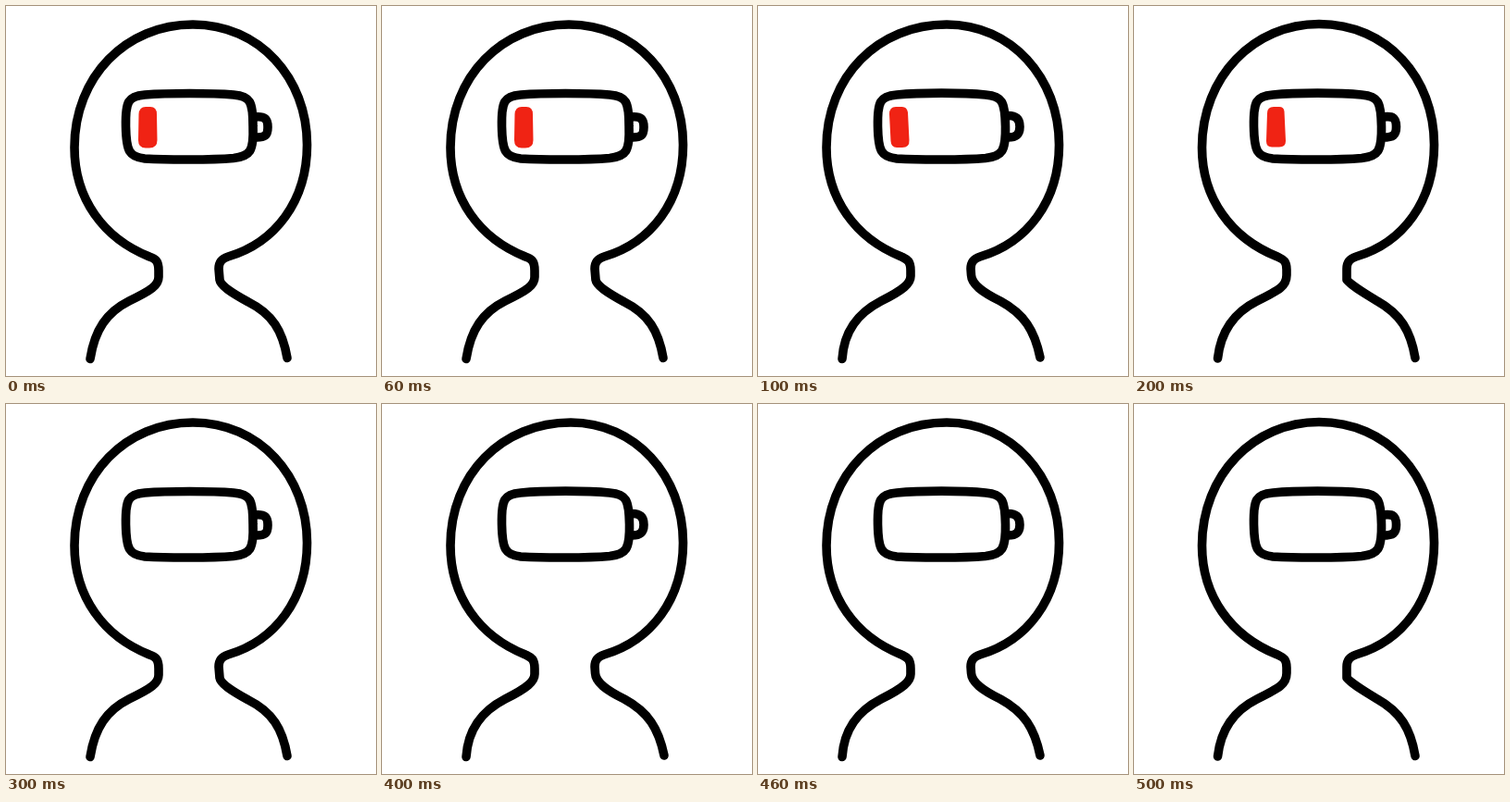
Write an HTML page that moves like this. It is 400 px wide and 400 px high and loops after 600 ms.

```html
<!DOCTYPE html>
<html lang="en">
<head>
<meta charset="utf-8">
<title>Low battery</title>
<style>
  html, body { margin: 0; height: 100%; overflow: hidden; background: #fff; }
  svg { display: block; width: 100vw; height: 100vh; }
  .line { fill: none; stroke: #000; stroke-width: 9.6; stroke-linecap: round; stroke-linejoin: round; }
</style>
</head>
<body>
<svg viewBox="0 0 400 400">
  <path id="body" class="line"/>
  <path id="cell" class="line"/>
  <path id="nub" class="line"/>
  <path id="charge" fill="#f02314"/>
</svg>
<script>
const STEP = 100;

// Three hand-drawn poses; only these details wobble.
const poses = [
  {
    top: 202, y: 20, left: 74, right: 325.5, start: '91,381.5 C96,350 109,331 133,319',
    neckL: 'C157,307.500 165,302 165,293 L165,286 C165,275 161,273 155,271',
    neckR: 'L231,296 C232,302 242,309 262,320', end: '304,380.5',
    cellTop: 95, cellRight: 267,
    nub: 'M269,120 C280,119 283,122 283,131 C283,140 280,142.500 269,142',
    charge: 'M151,109 H156 Q163,109 163,117 L163.500,145 Q163.500,153.500 155,153.500 H151 Q143,153.500 143,145 L143.500,117 Q144,109 151,109Z'
  },
  {
    top: 204, y: 20, left: 74, right: 325.5, start: '91,381.5 C93,351 108,332 133,319',
    neckL: 'C157,307 165,300 165,292 V286 C165,275 161,274 155,271',
    neckR: 'L230.500,291 C231,301 242,309 262,319', end: '305,380',
    cellTop: 94.5, cellRight: 267.5,
    nub: 'M269,118.500 C279,118 283,122 283,130.500 C283,139 279,142.500 269,142',
    charge: 'M149,109 H155 Q161,108.500 162,115 L163.500,145 Q164,153 156,153 H150 Q144,153 143.500,146 L142,117 Q142,109 149,109Z'
  },
  {
    top: 200, y: 19.5, left: 73.5, right: 324.5, start: '90.5,381 C94,350 109,331 133,319',
    neckL: 'C157,307 165,303 165,291 V285 C165,275 161,274 155,271',
    neckR: 'L230,296 C235,302 245,308 263,319', end: '304,380.5',
    cellTop: 94.5, cellRight: 267.5,
    nub: 'M269,120 C280,118.500 283.500,121 283.500,130.500 C283.500,140 280,142 269,142',
    charge: 'M151,109 H157 Q162,109 162.500,114 L164,146 Q164,152.500 157,152.500 H150 Q143,153 143,146 L144,116 Q144,109 151,109Z'
  }
];

const bodyPath = p => `M${p.start} ${p.neckL}
  C105,251 ${p.left},208 ${p.left},153
  C${p.left},76 130,${p.y} ${p.top},${p.y}
  C274,${p.y} ${p.right},78 ${p.right},150
  C${p.right},211 291,256 240,271
  C232,273.500 230,278 230,284 ${p.neckR}
  C288,333 299,351 ${p.end}`;

const cellPath = ({ cellTop: t, cellRight: r }) => `M129.500,130
  C129,103 132,97.500 150,96 C175,${t - 1} 222,${t - 1} 246,96
  C264,97.500 267,103 ${r},130
  C268,157 264,162.500 246,164.500 C222,166.500 175,166.500 150,165
  C133,163 130,157 129.500,130Z`;

const $ = id => document.getElementById(id);

function draw(now) {
  const step = Math.floor(now / STEP) % 6;
  const pose = poses[step % 3];
  $('body').setAttribute('d', bodyPath(pose));
  $('cell').setAttribute('d', cellPath(pose));
  $('nub').setAttribute('d', pose.nub);
  $('charge').setAttribute('d', pose.charge);
  $('charge').style.display = step < 3 ? '' : 'none';
}

const begin = performance.now();
function tick() {
  draw(performance.now() - begin);
  requestAnimationFrame(tick);
}
tick();
</script>
</body>
</html>
```
